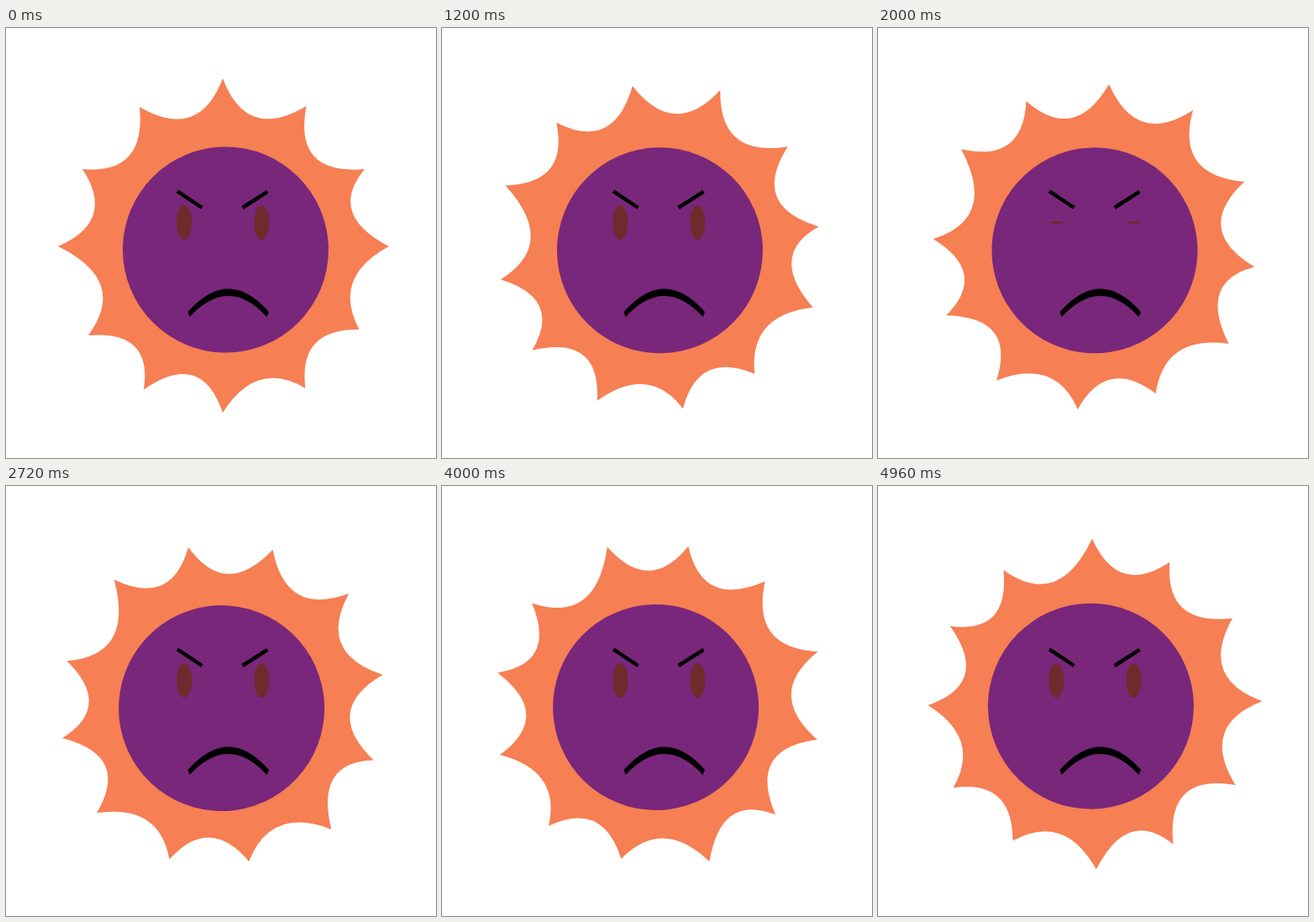
Animation of 512x512 px, one loop 5000 ms. Source, as an HTML page:

```html
<!DOCTYPE html>
<html lang="en">
<head>
<meta charset="utf-8">
<title>Angry sun</title>
<style>
  html, body { margin: 0; height: 100%; overflow: hidden; background: #fff; }
  svg { display: block; width: 100vw; height: 100vh; }
</style>
</head>
<body>
<svg viewBox="0 0 512 512">
  <g id="sun">
    <path id="rays" fill="#f67f53"/>
    <circle cx="261.5" cy="264" r="122.5" fill="#79277b"/>
  </g>
  <g fill="#702a2c">
    <ellipse class="eye" cx="212.3" cy="231.5" rx="9" ry="20.5"/>
    <ellipse class="eye" cx="304.3" cy="231.5" rx="9" ry="20.5"/>
  </g>
  <path d="M204 194.3L233.5 214M311.5 194.8L281.5 214" stroke="#000" stroke-width="4.5"/>
  <path d="M216.5 338Q265 283 313 338L310.5 344Q265 294 218.5 344Z"/>
</svg>
<script>
const LOOP = 5000, CENTER = [258.4, 259];
const BLINK_AT = 2000, BLINK_HALF = 200, EYE_HEIGHT = 20.5, CLOSED = 0.07;

// Each entry: ray tip x, y, then the midpoint of the valley that follows it.
const points = [
  [258, 60, 297, 106], [357.5, 93, 367, 153], [427, 168, 412, 218], [456, 260, 413, 303],
  [420.5, 359, 368, 376], [356.5, 429, 303, 419], [258, 458, 222, 413.5], [164, 430.5, 153, 379],
  [98, 366, 113, 307], [62, 260, 104, 222], [91, 168, 146, 153], [159, 94, 219, 106]
];

const rays = points.map(([x, y, midX, midY], i) => {
  const [nextX, nextY] = points[(i + 1) % points.length];
  const controlX = 2 * midX - (x + nextX) / 2;
  const controlY = 2 * midY - (y + nextY) / 2;
  return `Q${controlX} ${controlY} ${nextX} ${nextY}`;
});
document.getElementById("rays").setAttribute("d", `M${points[0][0]} ${points[0][1]}${rays.join("")}Z`);

const sun = document.getElementById("sun");
const eyes = document.querySelectorAll(".eye");

function draw(now) {
  const t = now % LOOP;
  sun.setAttribute("transform", `rotate(${90 * t / LOOP} ${CENTER})`);
  const openness = Math.min(1, Math.abs(t - BLINK_AT) / BLINK_HALF);
  const ry = EYE_HEIGHT * (CLOSED + (1 - CLOSED) * openness);
  eyes.forEach(eye => eye.setAttribute("ry", ry));
  requestAnimationFrame(draw);
}

draw(0);
</script>
</body>
</html>
```
